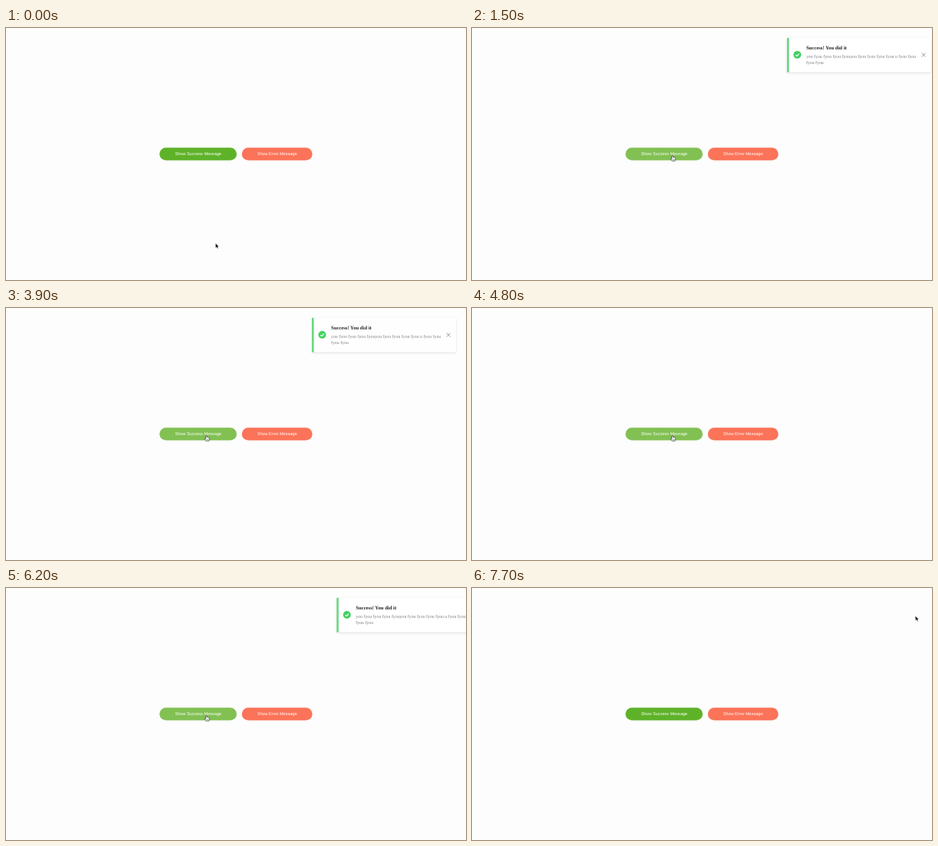
These frames come from a looping animation (600 px wide and 329 px high, 8000 ms). An HTML page:

```html
<!DOCTYPE html>
<html lang="en">
<head>
<meta charset="utf-8">
<title>Toast messages</title>
<style>
  html, body { margin: 0; width: 100%; height: 100%; overflow: hidden; background: #fdfdfd; }
  svg { display: block; width: 100%; height: 100%; }
  text { text-rendering: geometricPrecision; }
  .label { font: 5.556px "Liberation Sans", Arial, sans-serif; fill: #fff; text-anchor: middle; }
  .title { font: bold 6.667px "Liberation Serif", Times, serif; fill: #222; }
  .body { font: 5.833px "Liberation Serif", Times, serif; fill: #777; }
  .card { filter: drop-shadow(0 1.6px 1.8px rgba(0, 0, 0, .13)); }
</style>
</head>
<body>
<svg viewBox="0 0 600 329">
  <rect width="600" height="329" fill="#fdfdfd"/>

  <rect id="success" x="200.2" y="156.2" width="100.7" height="16.6" rx="8.3"/>
  <text class="label" x="250.7" y="166.4">Show Success Message</text>
  <rect x="307.6" y="156.2" width="92" height="16.6" rx="8.3" fill="#fb7358"/>
  <text class="label" x="353.6" y="166.4">Show Error Message</text>

  <g id="toast">
    <rect class="card" y="12.9" width="188" height="44.8" fill="#fff"/>
    <rect y="12.9" width="2.5" height="44.8" fill="#62d77b"/>
    <circle cx="13.4" cy="35" r="5" fill="#40d160"/>
    <path d="M11.2 35.1l1.6 1.6 3-3.1" fill="none" stroke="#fff" stroke-width="1.2"/>
    <text class="title" x="25" y="28.3">Success! You did it</text>
    <text class="body" x="25" y="38.6">you fyou fyou fyou fyouyou fyou fyou fyou fyou u fyou fyou</text>
    <text class="body" x="25" y="47.3">fyou fyou</text>
    <path d="M175.7 32.7l5 5m0-5l-5 5" stroke="#888" stroke-width=".85"/>
  </g>

  <path id="arrow" d="M0 0V6.2L1.4 4.9 2.4 7.1 3.5 6.6 2.6 4.5H4.5Z"
        fill="#000" stroke="#fff" stroke-width=".45" stroke-linejoin="round"/>
  <g id="hand" stroke-linejoin="round" stroke-linecap="round">
    <path d="M-.7 .6Q0-.4.7.6V2.7Q1.4 2.2 2 2.9 2.7 2.5 3.2 3.2 4.2 3 4.2 4.2V5.8Q4 6.8 3.4 7.8H-.3Q-1 6.5-2.3 4.8-2.2 3.7-.7 4.8Z"
          fill="#fff" stroke="#222" stroke-width=".6"/>
    <path d="M.8 5.3V6.6M1.9 5.3V6.6M3 5.3V6.6" stroke="#222" stroke-width=".35"/>
  </g>
</svg>
<script>
const LOOP = 8000, STEP = 100;
const REST = 399, TRAVEL = 201;
const el = id => document.getElementById(id);
const success = el("success"), toast = el("toast"), arrow = el("arrow"), hand = el("hand");
const clamp = v => Math.min(1, Math.max(0, v));

// pointer stops: time, x, y
const stops = [
  [0, 273.3, 281], [100, 261.6, 222], [200, 261.6, 222], [400, 261.4, 172],
  [600, 261.2, 166], [6600, 261.2, 166], [6800, 541.8, 53.2],
  [7100, 562, 44], [7500, 578.3, 36.4], [8000, 578.3, 36.4]
];

// cubic-bezier(.25, .1, .25, 1)
function ease(x) {
  if (x <= 0 || x >= 1) return clamp(x);
  const curve = (s, a, b) => 3 * (1 - s) * (1 - s) * s * a + 3 * (1 - s) * s * s * b + s * s * s;
  let lo = 0, hi = 1;
  for (let i = 0; i < 24; i++) {
    const mid = (lo + hi) / 2;
    if (curve(mid, .25, .25) < x) lo = mid; else hi = mid;
  }
  return curve(lo, .1, 1);
}

function pointerAt(t) {
  const i = Math.max(1, stops.findIndex(s => s[0] >= t));
  const [t0, x0, y0] = stops[i - 1], [t1, x1, y1] = stops[i];
  const k = clamp((t - t0) / (t1 - t0));
  return [x0 + (x1 - x0) * k, y0 + (y1 - y0) * k];
}

function toastAt(t) {
  const second = t >= 5660;
  const x = REST + TRAVEL * (1 - ease((t - (second ? 5660 : 800)) / 1000));
  let alpha = second ? +(t < 7700) : 1 - clamp((t - 3880) / 920);
  if (t <= 800) alpha = 0;
  return [x, alpha];
}

function draw(t) {
  const hover = t >= 400 && t < 6700;
  const at = `translate(${pointerAt(t)})`;
  const [x, alpha] = toastAt(t);
  success.setAttribute("fill", hover ? "#82c053" : "#5eb228");
  toast.setAttribute("transform", `translate(${x})`);
  toast.setAttribute("opacity", alpha);
  arrow.setAttribute("transform", at);
  hand.setAttribute("transform", at);
  arrow.setAttribute("visibility", hover ? "hidden" : "visible");
  hand.setAttribute("visibility", hover ? "visible" : "hidden");
}

const start = performance.now();
function tick() {
  const t = (performance.now() - start) % LOOP;
  draw(Math.floor(t / STEP) * STEP);
  requestAnimationFrame(tick);
}
draw(0);
requestAnimationFrame(tick);
</script>
</body>
</html>
```
